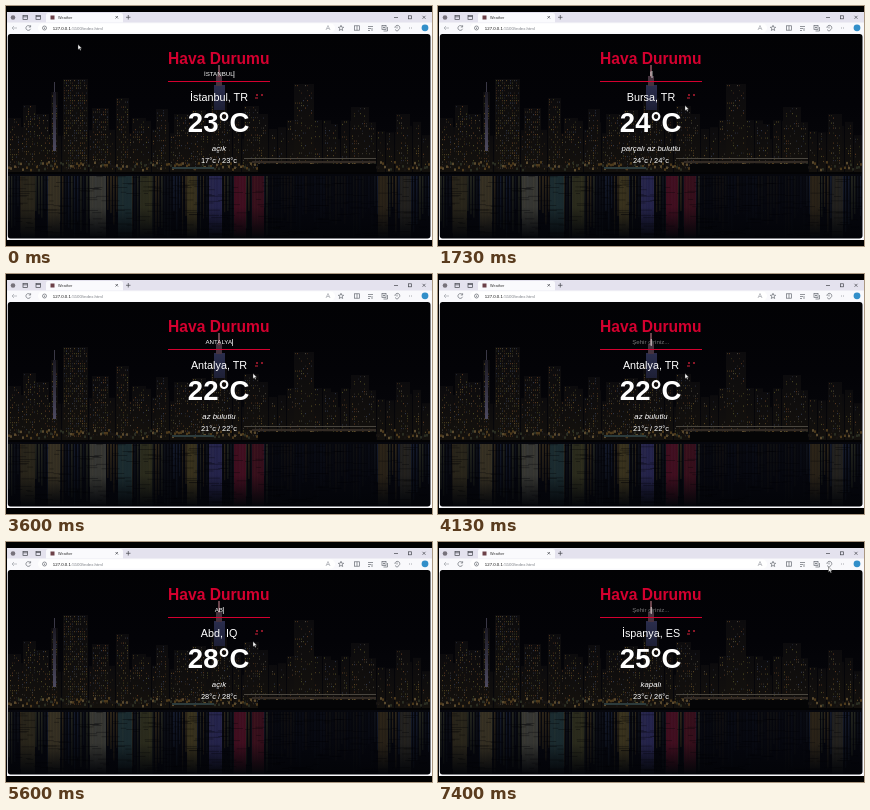
An HTML page with a canvas for the animation above (7.47 s loop, 426 px wide and 240 px high).

```html
<!DOCTYPE html>
<html lang="tr">
<head>
<meta charset="utf-8">
<title>Weather</title>
<style>
  html, body { margin: 0; width: 100%; height: 100%; overflow: hidden; background: #000; }
  canvas, svg { position: absolute; left: 0; top: 0; width: 100%; height: 100%; display: block; }
  text { font-family: "Liberation Sans", Arial, sans-serif; }
  .mid { text-anchor: middle; fill: #fff; }
  .icon { fill: none; stroke: #666a72; stroke-width: .7; }
</style>
</head>
<body>
<canvas id="photo" width="426" height="240"></canvas>
<svg viewBox="0 0 426 240">
  <!-- browser window -->
  <path fill="#f9f9fc" fill-rule="evenodd"
    d="M1 6H426V234H1Z M4.500 28H421.500Q424.500 28 424.500 31V229.500Q424.500 232.500 421.500 232.500H4.500Q1.800 232.500 1.800 229.500V31Q1.800 28 4.500 28Z"/>
  <rect x="1" y="6" width="425" height="10.500" fill="#e4e2ee"/>
  <path d="M40 16.500V9Q40 7 42 7H115Q117 7 117 9V16.500Z" fill="#fafafd"/>
  <rect x="32" y="17.500" width="297" height="9" rx="4.500" fill="#fff"/>
  <circle cx="7" cy="11.500" r="2.300" fill="#77727b"/>
  <g class="icon" style="stroke:#44464d">
    <rect x="17" y="9.500" width="4.500" height="4"/><path d="M17 10.800H21.500"/>
    <rect x="30" y="9.500" width="4.500" height="4"/><path d="M30 10.500H34.500"/>
    <path d="M109.500 10L112 12.500M112 10L109.500 12.500M120 11.300H124.500M122.300 9V13.500"/>
    <path d="M388 11.500H392M416.500 9.800L419.500 12.800M419.500 9.800L416.500 12.800"/>
    <rect x="402.500" y="9.800" width="3" height="3"/>
  </g>
  <rect x="44.500" y="9.500" width="4" height="4" fill="#6c4148"/>
  <text x="52" y="12.900" font-size="3.800" fill="#333">Weather</text>
  <g class="icon">
    <path d="M11 22H6M8 20L6 22L8 24" stroke="#a4a6ac"/>
    <path d="M24.300 20.600A2.400 2.400 0 1 0 24.600 22.800M24.600 19.200V21H22.800"/>
    <circle cx="38.500" cy="22" r="2"/><path d="M38.500 21.500V23"/>
    <path d="M320 24L322 19.500L324 24M320.800 22.500H323.200" stroke="#a4a6ac"/>
    <path d="M335 19.300L335.800 21.200L337.700 21.300L336.200 22.600L336.700 24.500L335 23.400L333.300 24.500L333.800 22.600L332.300 21.300L334.200 21.200Z"/>
    <rect x="348.500" y="19.800" width="5" height="4.400"/><path d="M351 19.800V24.200"/>
    <path d="M362 20.500H367M362 22.500H365M362 24.500H364M366 22V25"/>
    <rect x="376" y="19.500" width="4" height="4"/><path d="M377.500 25H381.500V21M378 20.500V22.500M377 21.500H379"/>
    <path d="M389 22A2.400 2.400 0 1 1 393 23.500L391 25.200L389 23.500M391 20.500V22.500"/>
    <path d="M403 22H407" stroke-dasharray=".8 1.200"/>
  </g>
  <circle cx="419" cy="21.800" r="3.400" fill="#328fc9"/>
  <text x="46.800" y="23.500" font-size="4.350" fill="#7c7f86"><tspan fill="#111">127.0.0.1</tspan>:5500/index.html</text>

  <!-- weather page -->
  <text class="mid" x="212.800" y="57.700" font-size="15.600" font-weight="bold" style="fill:#d4002f">Hava Durumu</text>
  <text class="mid" id="query" x="212.800" y="70.300" font-size="6.150"></text>
  <rect id="caret" y="65" width=".7" height="7" fill="#fff"/>
  <rect x="162" y="75" width="102" height="1" fill="#d4002f" shape-rendering="crispEdges"/>
  <text class="mid" id="city" x="213" y="95" font-size="10.800"></text>
  <text class="mid" id="temp" x="212.700" y="126" font-size="27.600" font-weight="bold"></text>
  <text class="mid" id="sky" x="213" y="145" font-size="7.800" font-style="italic"></text>
  <text class="mid" id="range" x="213" y="157" font-size="7.450"></text>
  <path id="mouse" d="M0 0V5.200L1.300 4.100L2.200 6L3.100 5.600L2.200 3.700H3.800Z" fill="#fff" stroke="#222" stroke-width=".4"/>
</svg>
<script>
const LOOP = 7470, FPS = 15, LAST = 111;
const $ = id => document.getElementById(id);

// type, enter and erase are counted in ticks of 1/15 s
const searches = [
  { word: 'İSTANBUL', type: -20, enter: 0, erase: 3, city: 'İstanbul, TR', temp: 23, sky: 'açık', low: 17, high: 23 },
  { word: 'BURSA', type: 13, enter: 19, erase: 21, city: 'Bursa, TR', temp: 24, sky: 'parçalı az bulutlu', low: 24, high: 24 },
  { word: 'İZMİR', type: 26, enter: 33, erase: 34, city: 'İzmir, TR', temp: 28, sky: 'parçalı az bulutlu', low: 28, high: 28 },
  { word: 'ANTALYA', type: 44, enter: 52, erase: 55, city: 'Antalya, TR', temp: 22, sky: 'az bulutlu', low: 21, high: 22 },
  { word: 'İTALYA', type: 63, enter: 70, erase: 73, city: 'İtalya, IT', temp: 17, sky: 'kapalı', low: 14, high: 18 },
  { word: 'ABD', type: 79, enter: 82, erase: 84, city: 'Abd, IQ', temp: 28, sky: 'açık', low: 28, high: 28 },
  { word: 'İSPANYA', type: 90, enter: 99, erase: 103, city: 'İspanya, ES', temp: 25, sky: 'kapalı', low: 23, high: 26 }
];
const mousePath = [[0, 72, 38.5], [2, 72, 38.5], [12, 247, 99.5], [104, 247, 99.5], [110, 390.5, 25]];

const clamp = (v, lo, hi) => Math.max(lo, Math.min(hi, v));

function mouseAt(tick) {
  const i = mousePath.findIndex(p => p[0] > tick);
  if (i < 0) return mousePath[mousePath.length - 1].slice(1);
  const [t0, x0, y0] = mousePath[i - 1], [t1, x1, y1] = mousePath[i];
  const u = (tick - t0) / (t1 - t0), e = u * u * (3 - 2 * u);
  return [x0 + (x1 - x0) * e, y0 + (y1 - y0) * e];
}

function inputAt(tick) {
  const s = searches.filter(q => q.type <= tick).pop(), n = s.word.length;
  const typed = clamp(tick - s.type + 1, 0, n);
  const erased = clamp(tick - s.erase + 1, 0, n);
  const keys = [s.type + typed - 1, s.enter, s.erase + erased - 1];
  const lastKey = Math.max(...keys.filter(k => k <= tick));
  return { text: s.word.slice(0, typed - erased), caret: (tick - lastKey) % 6 < 3 };
}

function render(tick) {
  const input = inputAt(tick), query = $('query');
  query.textContent = input.text || 'Şehir giriniz...';
  query.style.fill = input.text ? '#fff' : '#757575';
  const end = input.text ? 212.8 + query.getComputedTextLength() / 2 : 212.8;
  $('caret').setAttribute('x', end);
  $('caret').setAttribute('visibility', input.caret ? 'visible' : 'hidden');

  const r = searches.filter(q => q.enter <= tick).pop();
  $('city').textContent = r.city;
  $('temp').textContent = r.temp + '°C';
  $('sky').textContent = r.sky;
  $('range').textContent = `${r.low}°c / ${r.high}°c`;
  $('mouse').setAttribute('transform', `translate(${mouseAt(tick)})`);
}

function drawPhoto() {
  const c = $('photo').getContext('2d'), shore = 167;
  let seed = 7;
  const rand = () => (seed = seed * 16807 % 2147483647) / 2147483647;
  const pick = list => list[rand() * list.length | 0];
  const box = (color, x, y, w, h) => { c.fillStyle = color; c.fillRect(x, y, w, h); };
  const fade = (y0, y1, ...stops) => {
    const g = c.createLinearGradient(0, y0, 0, y1);
    stops.forEach((s, i) => g.addColorStop(i / (stops.length - 1), s));
    return g;
  };
  const lights = ['#5e4a26', '#4c4a24', '#5c3a22', '#31384a', '#48443c'];
  function tower(x, w, top, lit) {
    box(fade(top, shore, '#0c0b0d', '#14110d'), x, top, w, shore - top);
    for (let y = top + 1; y < shore - 4; y += 2.5)
      for (let k = x + 1; k < x + w - 1; k += 2)
        if (rand() < lit) {
          c.globalAlpha = .35 + rand() * .65;
          box(pick(lights), k, y, 1, 1.2);
        }
    c.globalAlpha = 1;
  }

  box(fade(28, shore, '#020204', '#030307', '#07070b'), 0, 28, 426, 140);

  // low distant blocks, then the main towers: x, width, top, share of lit windows
  for (let x = 2; x < 424; x += 9) tower(x, 8, 112 + rand() * 22, .3);
  const towers = [
    [3, 12, 112, .4], [17, 13, 99, .45], [30, 13, 108, .4], [45, 7, 86, .6], [57, 25, 73, .6],
    [86, 17, 102, .55], [110, 13, 92, .4], [126, 14, 112, .4], [150, 12, 103, .4], [168, 15, 108, .35],
    [186, 14, 104, .35], [205, 16, 92, .45], [238, 15, 100, .35], [252, 10, 108, .3], [288, 20, 78, .22],
    [318, 14, 118, .3], [345, 18, 101, .25], [390, 14, 108, .3]
  ];
  towers.forEach(t => tower(...t));
  box('#3a3846', 48, 76, 1, 10);
  box(fade(86, 145, '#1c1a24', '#4d4a60'), 47, 86, 3, 59);

  // central spire
  box(fade(78, 104, '#2b2e4e', '#1e2036'), 208, 79, 11, 25);
  box('#46333f', 210, 70, 6, 10);
  box('#6a444c', 212, 59, 2, 12);
  box('#8a1728', 250, 88, 2, 2);
  box('#8a1728', 255, 88, 2, 2);
  box('#6a1220', 249, 91, 3, 2);

  // waterfront and pier
  for (let x = 2; x < 424; x += 2)
    box(pick(['#4d3a1c', '#2a2d22', '#5a4a2e', '#171412']), x, 155 + rand() * 8, 2, 2.5);
  box('#2c3b3c', 166, 161, 42, 2);
  box('#4a463f', 238, 152, 132, 1);
  box('#332b25', 246, 155, 124, 2);
  box('#050506', 252, 158, 118, 8);
  box('#030304', 2, 166, 422, 4);

  // water with streaks; the right half lies mostly in the dark
  box(fade(168, 233, '#06070d', '#05060d', '#030408'), 0, 168, 426, 65);
  const dark = x => x > 262 && x < 366;
  for (let x = 2; x < 424; x += 3) {
    c.globalAlpha = dark(x) ? .25 : .9;
    const tint = pick(['#33291a', '#262820', '#161d30', '#10131c']);
    box(fade(170, 232, tint, '#04060a'), x, 170, 1 + rand(), 30 + rand() * 32);
  }
  // x, width, colour of the strong reflections
  const glows = [
    [15, 14, '#2f2a1c'], [42, 12, '#3d3626'], [84, 16, '#40403a'], [112, 14, '#1e3236'],
    [134, 12, '#32321f'], [181, 10, '#40381f'], [203, 13, '#2a2856'], [228, 12, '#4d0f22'],
    [246, 12, '#40101e'], [372, 10, '#2c2418'], [394, 11, '#262420']
  ];
  c.globalAlpha = .8;
  for (const [x, w, color] of glows)
    box(fade(170, 232, color, color, '#04060a'), x, 170, w, 62);
  c.globalAlpha = .4;
  for (let i = 0; i < 300; i++)
    box('#020306', rand() * 426, 170 + rand() * 62, 4 + rand() * 15, .8);
  c.globalAlpha = 1;
  box('#000', 0, 234, 426, 6);
}

drawPhoto();
const start = performance.now();
function loop() {
  const t = (performance.now() - start) % LOOP;
  render(Math.min(LAST, Math.floor((t + 5) * FPS / 1000)));
  requestAnimationFrame(loop);
}
loop();
</script>
</body>
</html>
```
